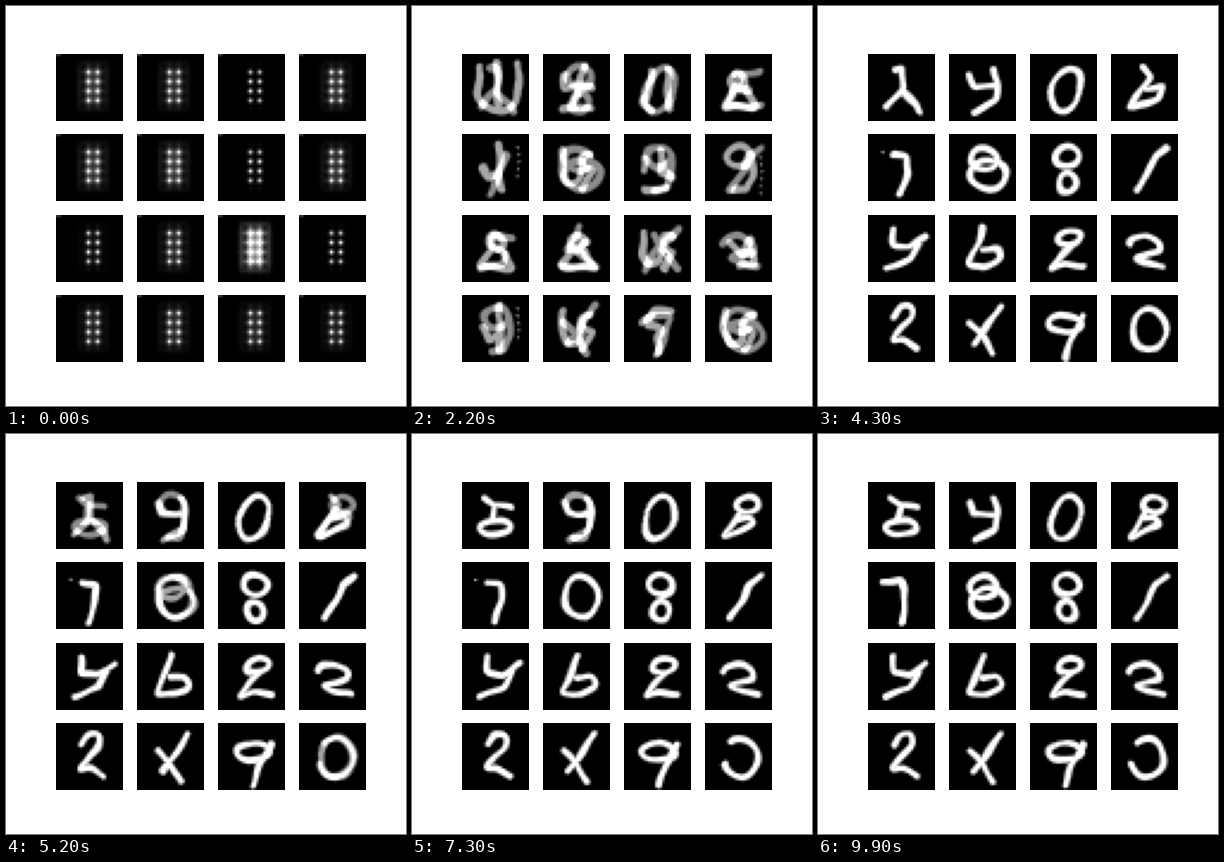
Write a matplotlib script that moves like this. It is 400x400 px and loops after 10 s.

```python
import numpy as np
import matplotlib.pyplot as plt
from matplotlib.animation import FuncAnimation

FRAMES, SIZE, STEPS = 100, 28, 40
KEYS = [14, 31, 43, 62, 85, 99]
YY, XX = np.mgrid[:SIZE, :SIZE].astype(float)


def pen(*xy):
    """Smooth stroke through a few points."""
    p = np.array(xy, float).reshape(-1, 2)
    s = np.r_[0, np.cumsum(np.hypot(*np.diff(p, axis=0).T))]
    kernel = np.hanning(9)[1:-1] / np.hanning(9).sum()
    t = np.linspace(0, s[-1], STEPS)
    return [np.convolve(np.pad(np.interp(t, s, v), 3, mode="edge"), kernel, "valid")
            for v in p.T] + [1]


def ring(cx, cy, rx, ry, start=0, stop=360, lean=0.0):
    """Arc in degrees, clockwise from the right; lean tips its top to the right."""
    t = np.radians(np.linspace(start, stop, STEPS))
    return [cx + rx * np.cos(t) - lean * ry * np.sin(t), cy + ry * np.sin(t), 1]


def dots(x, top, bottom):
    y = np.arange(top, bottom, 3)
    return [np.full(len(y), x), y, .3]


digits = {
    "0": [ring(14.5, 14.5, 6, 9, lean=.2)],
    "1": [pen(23, 5, 18, 9, 15, 16, 10, 23)],
    "2": [pen(7, 12, 8, 9, 14, 8, 20, 11, 20, 15, 9, 17, 15, 20, 22, 21)],
    "4": [pen(8.5, 8, 8, 14, 20, 13), pen(17, 4, 14, 15, 12, 22), pen(8, 22, 20, 22)],
    "6": [pen(14, 4, 12, 11, 7, 21, 15, 21, 22, 18, 20, 13, 13, 14)],
    "7": [pen(10, 8, 16, 9, 16, 16, 13, 25), dots(5.5, 7, 9)],
    "8": [ring(14, 10, 5.5, 4.5), ring(16, 16.5, 7.5, 6)],
    "9": [ring(14, 11.5, 7, 3.5), pen(22, 8, 17, 17, 14, 26)],
}
looped = {
    "a": [pen(9, 6, 13, 9, 20, 10), pen(13, 10, 12, 15), ring(13.5, 18.5, 6.5, 3)],
    "D": [ring(14.5, 14, 7, 8, -125, 160)],
    "e": [pen(10, 9, 13, 4, 18, 4, 18, 9, 13, 14, 9, 19, 14, 18, 20, 22)],
    "g": [ring(15, 9, 5, 4.2), ring(15, 20, 3.5, 4)],
    "O": [ring(15.5, 14, 7, 8.5)],
    "q": [ring(14, 9, 5, 4.2), pen(19, 8, 19.5, 17, 17, 23, 12, 23)],
    "s": [ring(17.5, 9, 4.5, 3.2), pen(15, 11, 7, 23, 20, 17, 18, 14, 13, 15)],
    "z": [ring(16, 9, 4.5, 3, lean=.4), pen(18, 11, 13, 16, 8, 22, 14, 20, 22, 21)],
}
strokes = {
    "A": [pen(11, 6, 14, 5, 14, 14, 7, 22), pen(14, 15, 20, 21, 21, 24)],
    "b": [pen(13, 5, 16, 9, 7, 22), pen(8, 22, 20, 18, 21, 13, 14, 14)],
    "E": [pen(12, 8, 22, 7), pen(15, 9, 8, 22, 23, 21), pen(11, 15, 18, 14)],
    "l": [pen(18, 8, 15, 17, 11, 25)],
    "r": [pen(5, 8, 13, 7, 15, 11, 14, 25)],
    "S": [pen(21, 9, 13, 8, 11, 13, 18, 15, 17, 20, 7, 22)],
    "t": [pen(15, 4, 12, 11, 9, 14, 18, 11), pen(14, 14, 18, 19, 22, 21, 7, 21)],
    "T": [pen(7, 11, 8, 9, 19, 8, 17, 15, 13, 25)],
    "v": [pen(8, 8, 10, 13, 18, 13), pen(18, 6, 20, 12, 19, 19, 10, 24)],
    "x": [pen(21, 4, 15, 13, 10, 20), pen(8, 11, 13, 16, 18, 24)],
    "X": [pen(23, 5, 13, 14, 8, 23), pen(12, 8, 14, 13, 19, 17, 22, 22)],
    "y": [pen(10, 5, 10, 12, 17, 13, 24, 8), pen(21, 11, 17, 18, 7, 22)],
}
scribbles = {
    "c": [ring(13.5, 11, 3, 3), pen(12, 14, 7, 21, 21, 22, 17, 15)],
    "d": [pen(15, 4, 15.5, 23), pen(8, 13, 11, 18, 15, 16), dots(23, 5, 20)],
    "f": [pen(9, 10, 12, 6, 19, 6), pen(10, 12, 16, 14, 13, 18, 14, 24)],
    "H": [pen(11, 6, 10, 16, 7, 20, 11, 23), pen(18, 6, 18, 23)],
    "k": [pen(10, 11, 15, 17, 19, 9), pen(14, 21, 20, 20, 19, 15)],
    "Q": looped["q"] + [dots(23, 9, 25)],
    "u": [pen(8, 6, 7, 15, 10, 21, 15, 19, 16, 8, 20, 8), pen(16, 13, 20, 15, 16, 22)],
    "w": [pen(8, 10, 8, 15), pen(15, 6, 15, 15, 20, 18), pen(8, 23, 17, 22)],
    "W": [pen(7, 4, 6, 18, 10, 23, 19, 23, 23, 19, 23, 3), pen(14.5, 3, 14.5, 21)],
}
SHAPES = digits | looped | strokes | scribbles

# What every cell reads as at each key time.
CELLS = ("WAAaaa 4gvqvv H00000 cEbsss "
         "dl777r u88OO8 wqgggg Q11111 "
         "cSyyyy ct6666 uXzzzz k22222 "
         "dqeeee uxxxxx fT9999 u8ODDD").split()

# Strength of the checkerboard glow per cell at the start.
HALO = [.6, .5, 0, .5, .6, .65, .05, .5, .15, .45, 1.6, .05, .35, .45, .4, .3]


def lattice(i):
    """Round dots every four pixels over a glow that fades from the centre."""
    a = (1 + np.cos((XX - 13) * np.pi / 2)) / 2
    b = (1 + np.cos((YY - 11) * np.pi / 2)) / 2
    core = np.exp(-((XX - 15) / 3.4) ** 6 - ((YY - 13) / 8) ** 6)
    wide = np.exp(-((XX - 15) / 6.5) ** 6 - ((YY - 13) / 10) ** 6)
    img = core * (a * b) ** 1.5 + HALO[i] * wide * (.05 + .2 * np.maximum(a, b))
    img += .25 * HALO[i] * core
    img[0, :2] = .2
    return img.clip(0, 1)


def ink(name, x, y, width, soft):
    img = np.zeros((SIZE, SIZE))
    for px, py, scale in SHAPES[name]:
        dist = np.sqrt(((x[..., None] - px) ** 2 + (y[..., None] - py) ** 2).min(-1))
        img = np.maximum(img, np.clip((width * scale - dist) / soft + .5, 0, 1))
    return img


def draw_cell(names, n, rng):
    """Fade from one reading to the next on a slightly shaken grid."""
    k = int(np.clip(np.searchsorted(KEYS, n, "right") - 1, 0, len(KEYS) - 2))
    u = np.clip((n - KEYS[k]) / (KEYS[k + 1] - KEYS[k]), 0, 1)
    u = u * u * (3 - 2 * u)
    young = np.exp(-n / 12)
    early = max(0, 1 - n / KEYS[0])
    shake = .25 + .8 * young
    p, q = rng.uniform(0, 2 * np.pi, 2)
    x = XX + shake * np.sin(YY / 2.2 + p)
    y = YY + shake * np.sin(XX / 2.2 + q)
    pressure = 1.35 + 1.4 * young + .25 * np.sin(XX / 3 + q) * np.sin(YY / 3 + p)
    a, b = names[k], names[k + 1]
    soft = 1.1 + 3 * early
    img = ink(a, x, y, pressure, soft)
    if a != b and u > 0:
        img = 1.2 * ((1 - u) * img + u * ink(b, x, y, pressure, soft))
    return img.clip(0, 1)


fig, axes = plt.subplots(4, 4, figsize=(4, 4), dpi=100)
images = []
for ax in axes.flat:
    ax.axis("off")
    images.append(ax.imshow(np.zeros((SIZE, SIZE)), cmap="gray", vmin=0, vmax=1))


def update(n):
    rng = np.random.default_rng(n + 7)
    learned = min(1, n / 3)
    for i, im in enumerate(images):
        img = (1 - learned) * lattice(i)
        if n:
            img = img + learned * draw_cell(CELLS[i], n, rng)
        im.set_data(img)
    return images


anim = FuncAnimation(fig, update, frames=FRAMES, interval=100, repeat=True)
plt.show()
```
